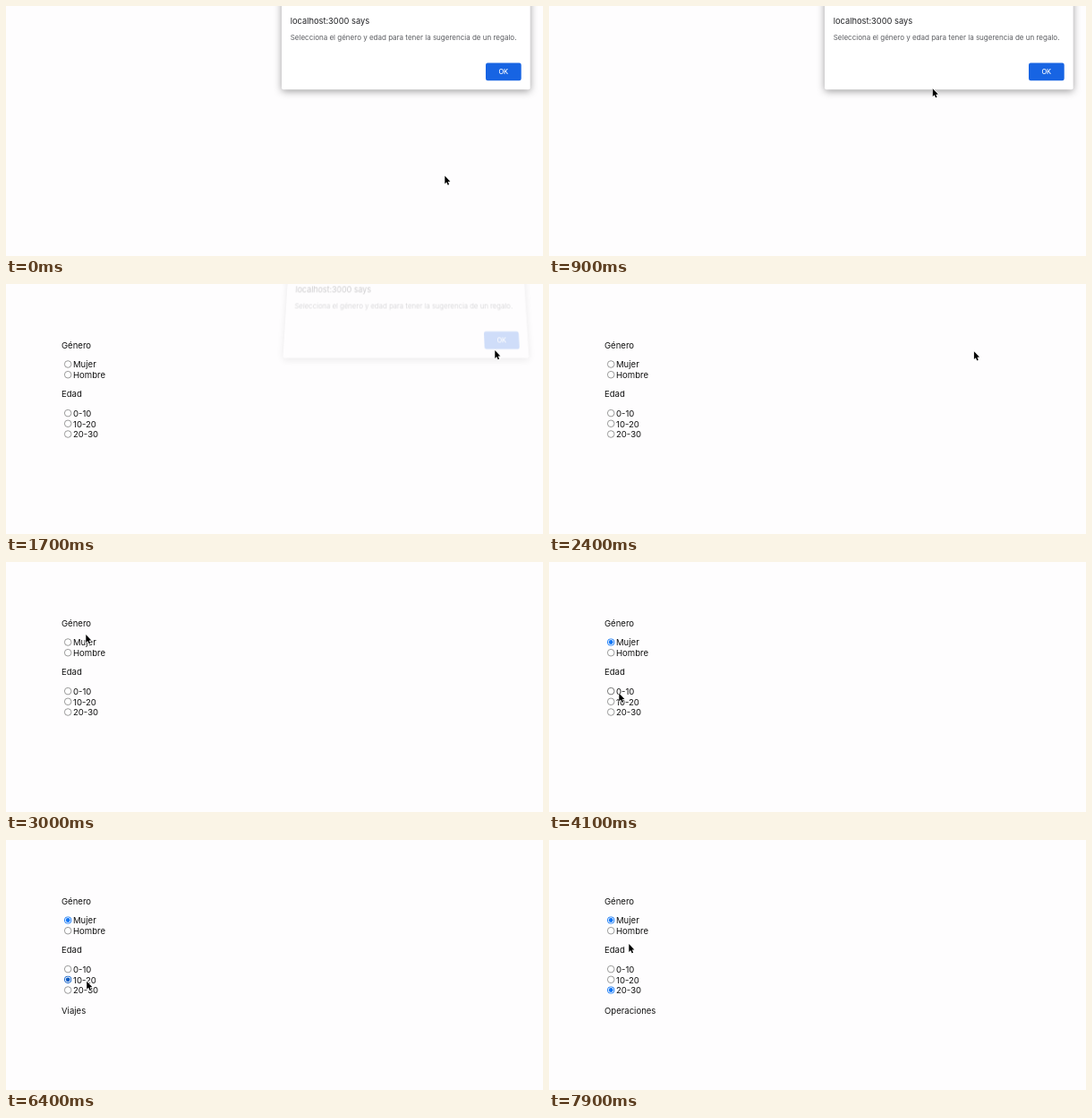
An HTML page with a canvas for the animation above (8 s loop, 600 by 279 pixels).

```html
<!DOCTYPE html>
<html lang="es">
<head>
<meta charset="utf-8">
<title>Sugerencia de regalo</title>
<style>
  html, body { margin: 0; width: 100%; height: 100%; overflow: hidden; background: #fefefe; }
  canvas { display: block; width: 600px; height: 279px; }
</style>
</head>
<body>
<canvas id="stage"></canvas>
<script>
const W = 600, H = 279, LOOP = 8000, STEP = 100;
const FONT = 'Inter, Roboto, sans-serif';
const ratio = window.devicePixelRatio || 1;

function setUp(canvas) {
  canvas.width = W * ratio;
  canvas.height = H * ratio;
  const c = canvas.getContext('2d');
  c.scale(ratio, ratio);
  return c;
}

const ctx = setUp(document.getElementById('stage'));
const sheet = document.createElement('canvas');
const sheetCtx = setUp(sheet);

// Pointer stops: time, x, y
const path = [
  [0, 490, 189], [600, 419, 93], [800, 419, 93], [1400, 546, 73.5],
  [2200, 546, 73.5], [3000, 89, 80.5], [3100, 89, 88], [3800, 89, 88],
  [4100, 78, 146], [4500, 79, 148], [5200, 79, 148], [5600, 90, 156],
  [6300, 90, 156.5], [6900, 89, 166], [7600, 89, 166], [7900, 89, 115.5]
];

const ease = u => u * u * (3 - 2 * u);

function pointerAt(t) {
  const i = path.findIndex(p => p[0] > t);
  if (i < 0) return path[path.length - 1].slice(1);
  const [t0, x0, y0] = path[i - 1], [t1, x1, y1] = path[i];
  const u = ease((t - t0) / (t1 - t0));
  return [x0 + (x1 - x0) * u, y0 + (y1 - y0) * u];
}

function text(c, str, x, y, size, color, weight = 400, align = 'left') {
  c.font = `${weight} ${size}px ${FONT}`;
  c.textAlign = align;
  c.fillStyle = color;
  c.fillText(str, x, y);
}

function box(c, x, y, w, h, r, color) {
  c.beginPath();
  c.roundRect(x, y, w, h, r);
  c.fillStyle = color;
  c.fill();
}

function disc(x, y, r, color) {
  ctx.beginPath();
  ctx.arc(x, y, r, 0, Math.PI * 2);
  ctx.fillStyle = color;
  ctx.fill();
}

function ring(x, y, r, width, color) {
  ctx.beginPath();
  ctx.arc(x, y, r, 0, Math.PI * 2);
  ctx.lineWidth = width;
  ctx.strokeStyle = color;
  ctx.stroke();
}

function drawDialog(c, hover) {
  c.save();
  c.shadowColor = 'rgba(0,0,0,.38)';
  c.shadowBlur = 9 * ratio;
  c.shadowOffsetY = 2 * ratio;
  box(c, 308, -10, 277.7, 103.3, 2, '#fff');
  c.restore();
  text(c, 'localhost:3000 says', 317.7, 19.7, 9.3, '#202124');
  text(c, 'Selecciona el género y edad para tener la sugerencia de un regalo.',
    317.7, 38, 8, '#5a5c60');
  box(c, 536, 63.5, 39.7, 19.7, 2.2, hover ? '#2a6fe6' : '#1764e3');
  text(c, 'OK', 555.8, 76, 7.4, '#fff', 500, 'center');
}

// The dialog leaves tilted back: narrower toward its top edge.
function drawLeavingDialog() {
  sheetCtx.clearRect(0, 0, W, H);
  drawDialog(sheetCtx, true);
  ctx.save();
  ctx.globalAlpha = 0.22;
  for (let y = 0; y < 98; y++) {
    const s = 0.953 + 0.00045 * y;
    ctx.drawImage(sheet, 0, (y + 10.6) * ratio, W * ratio, ratio,
      447 * (1 - s), y, W * s, 1);
  }
  ctx.restore();
}

const options = [
  { label: 'Mujer', y: 89.5, on: t => t >= 3400 },
  { label: 'Hombre', y: 101.2, on: () => false },
  { label: '0-10', y: 144.1, on: t => t >= 4800 && t < 6000 },
  { label: '10-20', y: 155.8, on: t => t >= 6000 && t < 7200 },
  { label: '20-30', y: 167.5, on: t => t >= 7200 }
];

function drawRadio(y, on, hover) {
  if (on) {
    const blue = hover ? '#0b5bc4' : '#1276f5';
    disc(69.2, y, 4.1, blue);
    disc(69.2, y, 3.2, '#fff');
    disc(69.2, y, 2.4, blue);
  } else {
    disc(69.2, y, 3.8, '#fff');
    ring(69.2, y, 3.8, 0.7, hover ? '#404040' : '#707070');
  }
}

function drawForm(t, [px, py]) {
  const ink = '#111';
  text(ctx, 'Género', 62, 71.6, 9.55, ink);
  text(ctx, 'Edad', 62, 126.3, 9.55, ink);
  for (const { label, y, on } of options) {
    const hover = px > 64 && px < 112 && Math.abs(py - y) < 5.8;
    drawRadio(y, on(t), hover);
    text(ctx, label, 75, y + 3.8, 9.55, ink);
  }
  const gift = t < 4800 ? '' : t < 6000 ? 'Juguetes' : t < 7200 ? 'Viajes' : 'Operaciones';
  text(ctx, gift, 62, 193.7, 9.55, ink);
}

function drawPointer([x, y]) {
  const shape = [[0, 0], [0, 8.8], [2, 7], [3.3, 10.2], [4.8, 9.6], [3.5, 6.5], [6.1, 6.3]];
  ctx.save();
  ctx.translate(x + 0.3, y + 0.6);
  ctx.beginPath();
  shape.forEach(p => ctx.lineTo(...p));
  ctx.closePath();
  ctx.lineJoin = 'round';
  ctx.lineWidth = 1.3;
  ctx.strokeStyle = '#fff';
  ctx.stroke();
  ctx.fillStyle = '#000';
  ctx.fill();
  ctx.restore();
}

function draw(t) {
  const pointer = pointerAt(t), [px, py] = pointer;
  ctx.fillStyle = '#fefdfe';
  ctx.fillRect(0, 0, W, H);
  if (t >= 1700) drawForm(t, pointer);
  if (t < 1700) drawDialog(ctx, px > 536 && py < 83);
  else if (t < 1800) drawLeavingDialog();
  const pressed = (t >= 1400 && t < 1600) || (t >= 3200 && t < 3500);
  if (pressed) ring(px + 0.2, py + 0.6, 13.2, 1.3, '#1c1c24');
  drawPointer(pointer);
}

function tick() {
  const t = performance.now() % LOOP;
  draw(Math.floor(t / STEP) * STEP);
  requestAnimationFrame(tick);
}
tick();
</script>
</body>
</html>
```
